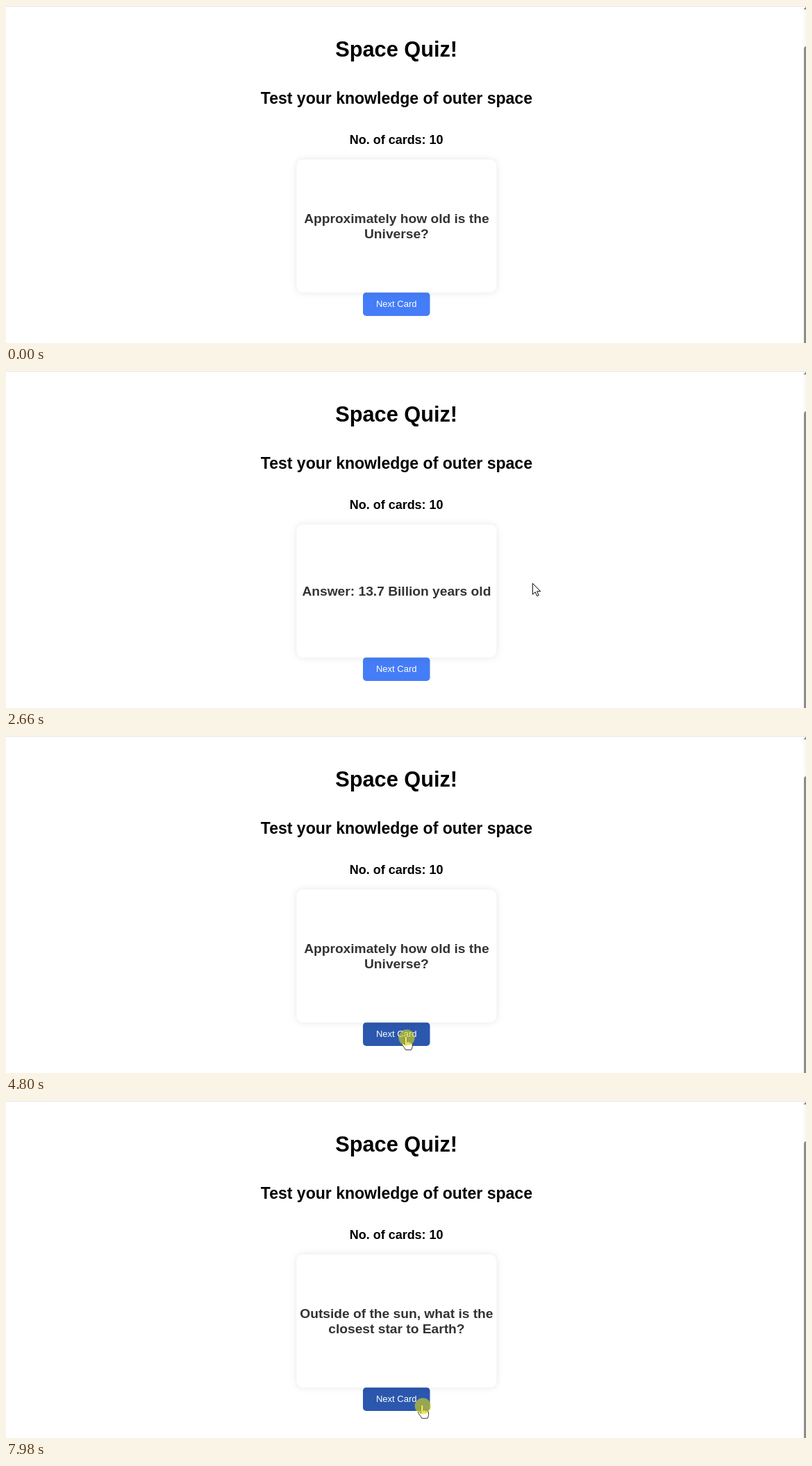
Write an HTML page that moves like this. It is 1152 px wide and 486 px high and loops after 8 s.

```html
<!DOCTYPE html>
<html lang="en">
<head>
<meta charset="utf-8">
<title>Space Quiz</title>
<style>
  html, body { margin: 0; width: 100%; height: 100%; overflow: hidden; background: #fff; }
  svg { display: block; width: 1152px; height: 486px; }
  text { text-anchor: middle; font-family: "Liberation Sans", Arial, sans-serif; }
  .head { font-weight: 700; }
  #lines { font-weight: 700; font-size: 19.2px; fill: #333; }
</style>
</head>
<body>
<svg viewBox="0 0 1152 486">
  <defs>
    <filter id="glow" filterUnits="userSpaceOnUse" x="350" y="150" width="424" height="336"
      color-interpolation-filters="sRGB">
      <feDropShadow id="shadow" dx="0" dy="0" flood-color="#000"/>
    </filter>
  </defs>

  <rect width="1152" height="1" fill="#e6e6e6"/>
  <rect x="1148" y="1" width="4" height="485" fill="#fafafa"/>
  <path d="M1148.5 5L1152 1V5Z" fill="#858585"/>
  <rect x="1149" y="58" width="8" height="440" rx="4" fill="#8b8b8b"/>

  <text class="head" x="562.2" y="72.8" font-size="30.72">Space Quiz!</text>
  <text class="head" x="562.4" y="140.5" font-size="23.04">Test your knowledge of outer space</text>
  <text class="head" x="562.2" y="199.4" font-size="17.97">No. of cards: 10</text>

  <rect id="button" x="514" y="413" width="96.5" height="34" rx="4.8"/>
  <text x="562.2" y="434.4" font-size="13" fill="#fff">Next Card</text>

  <g id="card">
    <rect x="418.4" y="221.2" width="288" height="192" rx="9.6" fill="#fff" filter="url(#glow)"/>
    <text id="lines"></text>
  </g>

  <g id="pointer">
    <path id="arrow" d="M0 0V16L3.8 12.5L6.4 18.4L8.8 17.3L6.3 11.6H11.4Z"
      fill="#fff" stroke="#000" stroke-linejoin="round"/>
    <g id="hand" transform="translate(-.8 -.3)" stroke="#333" stroke-linejoin="round" stroke-linecap="round">
      <path fill="#fff" d="M-2 0Q-2 -1.6 -.3 -1.6Q1.4 -1.6 1.4 0V6Q3.6 4.8 4.4 6.6Q6.3 5.6 7 7.4Q9 7 9 9V12.6Q9 15 7.4 18H-.6Q-2 15.2 -5.4 11Q-6.7 9.2 -5.4 8.5Q-4 8 -2 10.4Z"/>
      <path fill="none" stroke-width=".7" d="M1.4 6V8.6M4.4 6.6V9M7 7.4V9.4"/>
    </g>
    <circle id="press" r="11.7" fill="#dedb14" fill-opacity=".6"/>
  </g>
</svg>
<script>
const LOOP = 8000, ENTER = 70, GROW = 200, HOLD = 140, LINE = 22;
const CX = 562.4, CY = 317.2;
const $ = id => document.getElementById(id);

const first = "Approximately how old is the\nUniverse?";
const second = "Outside of the sun, what is the\nclosest star to Earth?";
const faces = [first, "Answer: 13.7 Billion years old", first,
  second, "Answer: Alpha Centauri", second];

// Each stop is reached on an arc that swings out by (bulge, lift).
const stops = [
  { x: 1090, y: 470, arrive: 0, leave: ENTER },
  { x: 583, y: 237, arrive: 1450, leave: 1650, lift: -210 },
  { x: 650.5, y: 298, arrive: 1910, press: 2260 },
  { x: 659.5, y: 331, arrive: 3450, press: 3860, bulge: 150 },
  { x: 577, y: 435, arrive: 4600, press: 4730, bulge: 300 },
  { x: 525, y: 294, arrive: 5740, press: 5810, bulge: 300 },
  { x: 677, y: 356, arrive: 6710, press: 6800, bulge: 170 },
  { x: 600.3, y: 440, arrive: 7860, press: 7930, bulge: 300 }
];
const clicks = stops.filter(stop => stop.press);
clicks.forEach(stop => { stop.leave = stop.press + HOLD; });

function pointAt(t) {
  const i = stops.findIndex(stop => stop.leave > t);
  const to = stops[i];
  if (i === 0 || t >= to.arrive) return to;
  const from = stops[i - 1];
  const p = (t - from.leave) / (to.arrive - from.leave);
  const swing = Math.sin(Math.PI * p);
  return {
    x: from.x + (to.x - from.x) * p + (to.bulge || 0) * swing,
    y: from.y + (to.y - from.y) * p + (to.lift || 0) * swing
  };
}

const inCard = ({ x, y }) => Math.abs(x - CX) < 144 && Math.abs(y - CY) < 96;
const inButton = ({ x, y }) => Math.abs(x - CX) < 48 && Math.abs(y - 430) < 17;

// Time the pointer has spent on the card, up to the length of the growth.
function hoverAge(t) {
  let age = 0;
  while (age < GROW && inCard(pointAt(t - age))) age += 5;
  return Math.min(age, GROW);
}

function setLines(face) {
  if ($("lines").dataset.face === face) return;
  $("lines").dataset.face = face;
  const rows = face.split("\n");
  $("lines").innerHTML = rows.map((row, i) => {
    const y = CY + 6.8 + (i - (rows.length - 1) / 2) * LINE;
    return `<tspan x="${CX}" y="${y}">${row}</tspan>`;
  }).join("");
}

const show = (id, on) => $(id).setAttribute("visibility", on ? "visible" : "hidden");

function draw(t) {
  const point = pointAt(t);
  const visible = t >= ENTER;
  const onButton = inButton(point);
  const isHand = onButton || inCard(point);

  const k = 1 - Math.pow(1 - hoverAge(t) / GROW, 2.3);
  const scale = 1 + 0.05 * k;
  $("card").setAttribute("transform",
    `translate(${CX} ${CY}) scale(${scale}) translate(${-CX} ${-CY})`);
  $("shadow").setAttribute("stdDeviation", 4.8 + 4.8 * k);
  $("shadow").setAttribute("flood-opacity", 0.1 + 0.1 * k);
  setLines(faces[clicks.filter(stop => stop.leave <= t).length]);

  $("button").setAttribute("fill", onButton ? "#2b57ae" : "#447df7");
  $("pointer").setAttribute("transform", `translate(${point.x} ${point.y})`);
  show("hand", visible && isHand);
  show("arrow", visible && !isHand);
  show("press", clicks.some(stop => t >= stop.press && t < stop.leave));
}

const start = performance.now();
function tick() {
  draw((performance.now() - start) % LOOP);
  requestAnimationFrame(tick);
}
tick();
</script>
</body>
</html>
```
